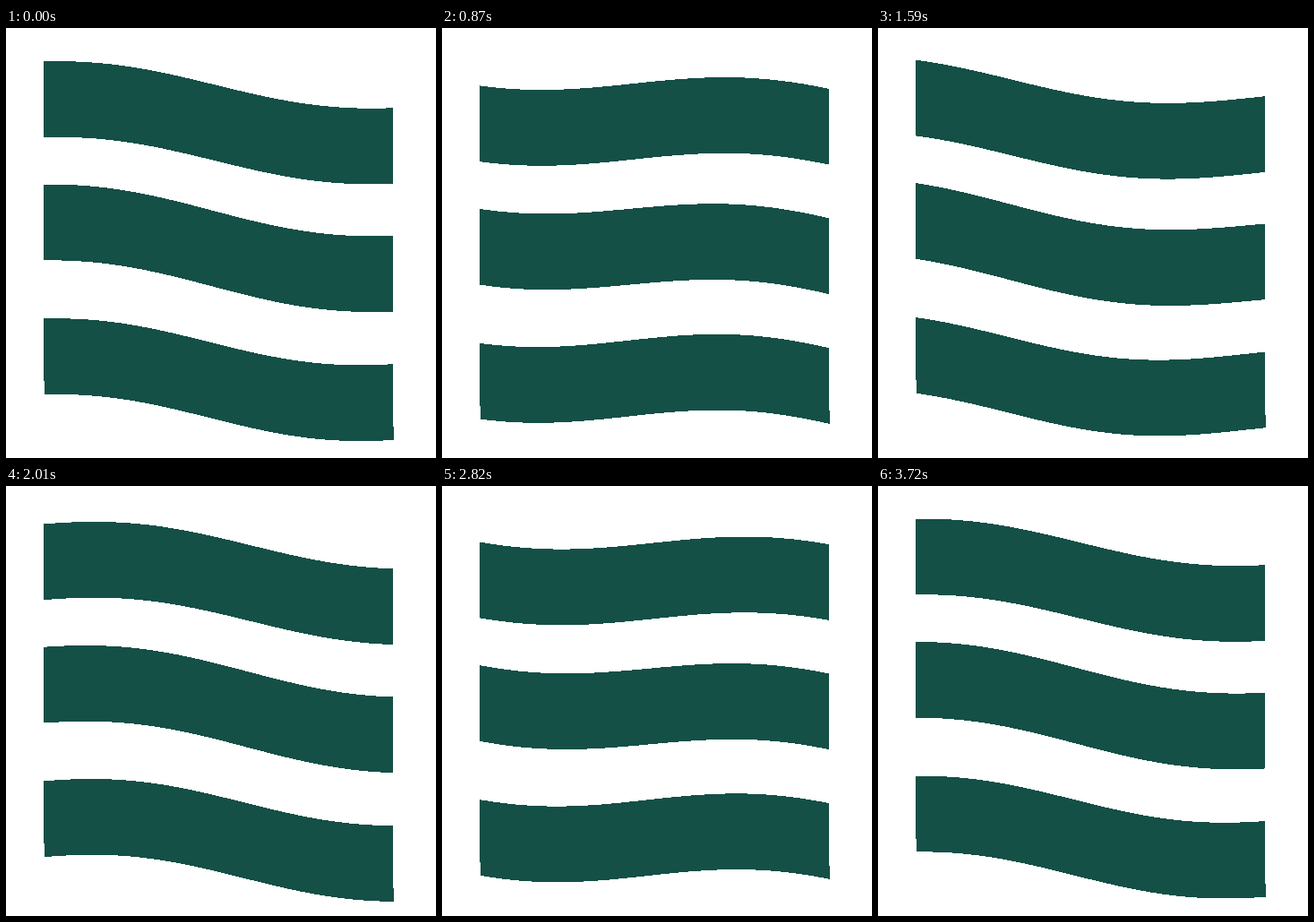
These frames come from a looping animation (480 px wide and 480 px high, 3750 ms). An HTML page:

```html
<!DOCTYPE html>
<html lang="en">
<head>
<meta charset="utf-8">
<title>Waving stripes</title>
<style>
  html, body { margin: 0; width: 100%; height: 100%; overflow: hidden; background: #fff; }
  svg { display: block; width: 100vw; height: 100vh; }
  path { fill: #145046; shape-rendering: crispEdges; }
</style>
</head>
<body>
<svg viewBox="0 0 480 480">
  <path/><path/><path/>
</svg>
<script>
const LEFT = 42, RIGHT = 432, STEPS = 130;
const LOOP = 3750, STEP_MS = 30, PERIOD = LOOP / 2;
const AMP = 15.4, HEIGHT = 84.7, RAD = Math.PI / 180;

// Rest height and wave phase (degrees) at both ends; lean shifts the lower edge.
const stripes = [
  { y: [50.1, 77.3], phase: [145.5, 399.3], lean: 0 },
  { y: [187.5, 220.8], phase: [146, 404], lean: 0 },
  { y: [337.4, 364.8], phase: [147, 407.6], lean: 0.61 }
];
const paths = document.querySelectorAll('path');
const lerp = ([a, b], u) => a + (b - a) * u;

function outline(s, angle) {
  const top = [], bottom = [];
  for (let i = 0; i <= STEPS; i++) {
    const u = i / STEPS;
    const x = lerp([LEFT, RIGHT], u);
    const y = lerp(s.y, u) + AMP * Math.cos((angle - lerp(s.phase, u)) * RAD);
    top.push(`${x.toFixed(2)} ${y.toFixed(2)}`);
    bottom.unshift(`${(x + s.lean).toFixed(2)} ${(y + HEIGHT).toFixed(2)}`);
  }
  return `M${top.join('L')}L${bottom.join('L')}Z`;
}

function draw(now) {
  const t = Math.floor((now % LOOP) / STEP_MS) * STEP_MS;
  const angle = t / PERIOD * 360;
  stripes.forEach((s, i) => paths[i].setAttribute('d', outline(s, angle)));
}

let start;
function tick(now) {
  start ??= now;
  draw(now - start);
  requestAnimationFrame(tick);
}
draw(0);
requestAnimationFrame(tick);
</script>
</body>
</html>
```
